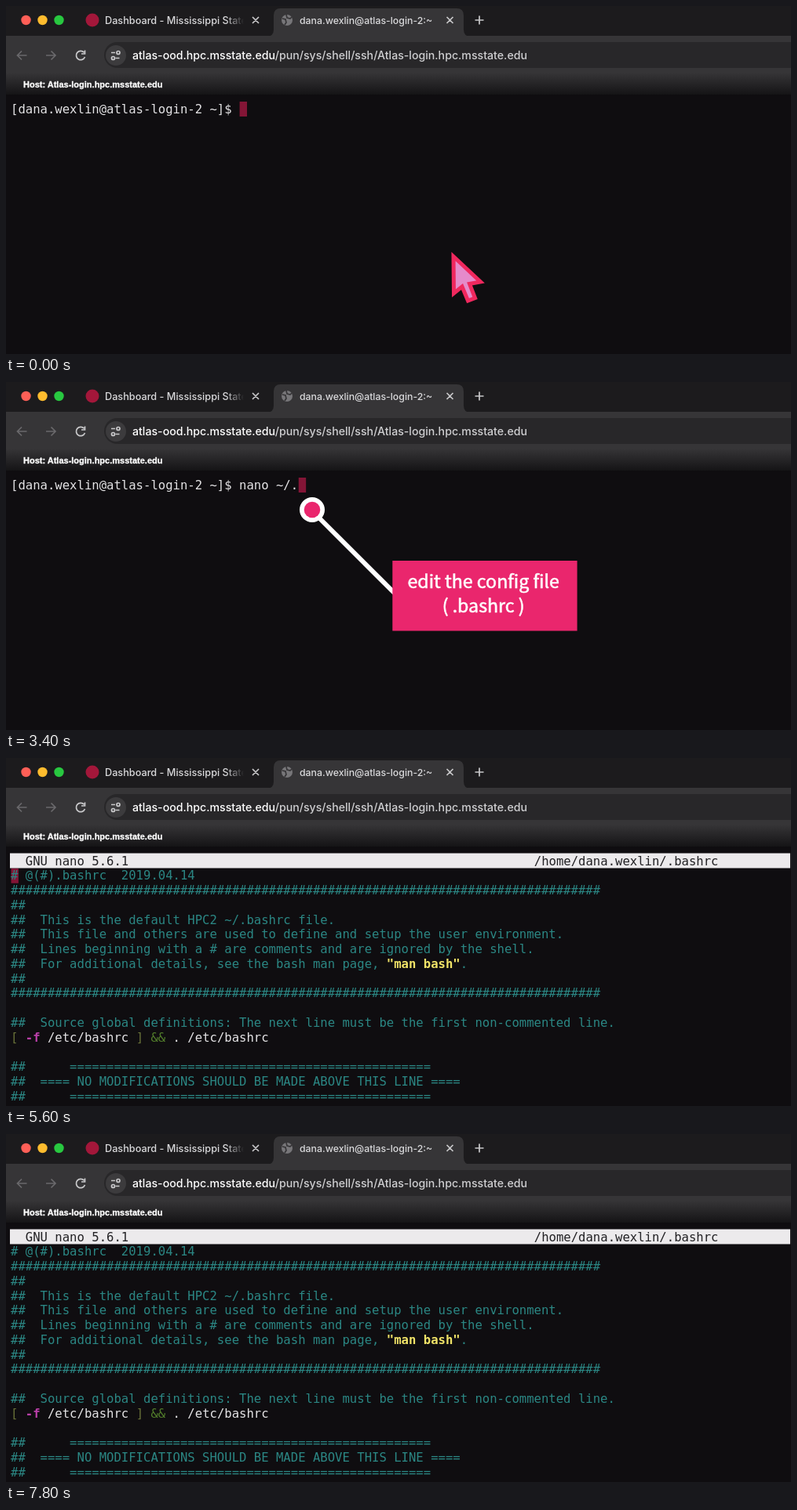
Recreate the animation shown at these times as an HTML page. Size 1000 by 444 pixels, loop 8 s.

```html
<!DOCTYPE html>
<html lang="en">
<head>
<meta charset="utf-8">
<title>Editing .bashrc on a login node</title>
<style>
  html, body { margin: 0; width: 100%; height: 100%; overflow: hidden; background: #0f0d10; }
  svg { display: block; width: 100%; height: 100%; }
  text { white-space: pre; }
  .ui { font: 500 12.7px Inter, Roboto, sans-serif; fill: #d9d9db; }
  .tab { font-size: 12.3px; }
  .url { font-size: 14.16px; fill: #d0d0d2; }
  .host { font: bold 11px "Liberation Sans", Arial, sans-serif; fill: #fff; stroke: #fff; stroke-width: .3; }
  .term { font: 15.6px "DejaVu Sans Mono", monospace; fill: #e4e3e5; }
  .note { font: 23.2px "Noto Sans CJK SC", "Noto Sans CJK JP", "Noto Sans", sans-serif;
          fill: #fff; stroke: #fff; stroke-width: .6; text-anchor: middle; }
  .icon { fill: none; stroke: #c9c9cb; stroke-width: 1.7; }
  .dim { stroke: #69686b; }
  .comment { fill: #2b8784; }
  .string { fill: #f1e468; font-weight: bold; }
  .flag { fill: #b93fa8; font-weight: bold; }
  .bracket { fill: #697239; }
  .operator { fill: #527d2b; }
</style>
</head>
<body>
<svg viewBox="0 0 1000 444">
  <defs>
    <linearGradient id="bar" x2="0" y2="1">
      <stop stop-color="#363537"/><stop offset="1" stop-color="#151416"/>
    </linearGradient>
    <linearGradient id="titleFade" gradientUnits="userSpaceOnUse" x1="280" x2="303">
      <stop stop-color="#d9d9db"/><stop offset="1" stop-color="#d9d9db" stop-opacity="0"/>
    </linearGradient>
  </defs>

  <rect width="1000" height="444" fill="#0f0d10"/>
  <rect width="1000" height="39" fill="#1c1b1d"/>
  <path d="M332 39q9 0 9-9V12q0-9 9-9h224q9 0 9 9v18q0 9 9 9z" fill="#363537"/>
  <rect y="38" width="1000" height="47" fill="#363537"/>
  <rect x="125" y="46" width="900" height="33" rx="16.5" fill="#282729"/>
  <rect y="85" width="1000" height="28" fill="url(#bar)"/>

  <circle cx="25.500" cy="18" r="6.200" fill="#ff5f57"/>
  <circle cx="46.500" cy="18" r="6.200" fill="#febc2e"/>
  <circle cx="67.500" cy="18" r="6.200" fill="#28c840"/>
  <circle cx="110" cy="18" r="8.500" fill="#a3173a"/>
  <circle cx="358" cy="18" r="7" fill="#777679"/>
  <path d="M352 16l4 1 1 4-2 3M357 11l1 4 4 1 2-2" class="icon" style="stroke:#363537"/>

  <g class="icon">
    <path d="M314 14l8 8m0-8l-8 8M561.500 14l8 8m0-8l-8 8M597.500 18h11m-5.500-5.500v11"/>
    <path class="dim" d="M26.500 63h-12m5.500-5.500l-5.500 5.500 5.500 5.500M51 63h12m-5.500-5.500l5.500 5.500-5.500 5.500"/>
    <path d="M99.500 59.300a5.700 5.700 0 1 0 1 5.700M100.500 56.500v4.500h-4.500"/>
    <circle cx="140" cy="63" r="13" fill="#3c3b3d" stroke="none"/>
    <path d="M134 59.500h5m5.500 7h-5"/>
    <circle cx="143" cy="59.500" r="2"/><circle cx="136.500" cy="66.500" r="2"/>
  </g>

  <text class="ui" x="126" y="22.500" style="fill:url(#titleFade)">Dashboard - Mississippi State</text>
  <text class="ui tab" x="374" y="22.500">dana.wexlin@atlas-login-2:~</text>
  <text class="ui url" x="161" y="68"><tspan fill="#fff">atlas-ood.hpc.msstate.edu</tspan>/pun/sys/shell/ssh/Atlas-login.hpc.msstate.edu</text>
  <text class="host" x="22" y="104">Host: Atlas-login.hpc.msstate.edu</text>

  <rect id="caret" width="9.400" height="19" fill="#831536"/>
  <text id="prompt" class="term" x="6" y="136.500"></text>
  <g id="editor" class="term">
    <rect x="5" y="121.500" width="994" height="19" fill="#eceaec"/>
  </g>
  <g id="notes"></g>
  <path id="pointer" d="M570 319.500L570.500 366.500 581 358 588.500 376 597.500 372.500 590.500 354.500 604.500 352z"
        fill="#e58aca" stroke="#f0285e" stroke-width="5"/>
</svg>
<script>
const LOOP = 8000, STEP = 200, FADE = 500;
const LEFT = 6, CELL = 9.391, ROW = 18.75, BASELINE = 136.5;
const $ = id => document.getElementById(id);
const clamp = (v, lo = 0, hi = 1) => Math.min(hi, Math.max(lo, v));
const col = n => LEFT + n * CELL;
const span = (cls, text) => `<tspan class="${cls}">${text}</tspan>`;

const PROMPT = '[dana.wexlin@atlas-login-2 ~]$ ';
const COMMAND = 'nano ~/.bashrc';
const KEY_TIMES = [400, 600, 800, 1000, 2200, 3000, 3200, 3400, 3800, 4000, 4200, 4400, 4600, 4800];
const EDITOR_OPENS = 5400;

// Editor screen
const hashes = '#'.repeat(80), rule = '##      ' + '='.repeat(49);
const fileLines = [
  '# @(#).bashrc  2019.04.14',
  hashes,
  '##',
  '##  This is the default HPC2 ~/.bashrc file.',
  '##  This file and others are used to define and setup the user environment.',
  '##  Lines beginning with a # are comments and are ignored by the shell.',
  '##  For additional details, see the bash man page, ' + span('string', '"man bash"') + '.',
  '##',
  hashes,
  '',
  '##  Source global definitions: The next line must be the first non-commented line.',
  span('bracket', '[') + span('flag', ' -f') + ' /etc/bashrc ' + span('bracket', ']') +
    span('operator', ' &amp;&amp;') + ' . /etc/bashrc',
  '',
  rule,
  '##  ==== NO MODIFICATIONS SHOULD BE MADE ABOVE THIS LINE ====',
  rule
];
const editorText = (x, row, html, attrs = '') =>
  `<text x="${x}" y="${BASELINE + row * ROW}" ${attrs}>${html}</text>`;
$('editor').innerHTML +=
  editorText(col(2), 0, 'GNU nano 5.6.1', 'fill="#222124"') +
  editorText(col(71), 0, '/home/dana.wexlin/.bashrc', 'fill="#222124"') +
  fileLines.map((line, i) =>
    editorText(LEFT, i + 1, line, line[0] === '#' ? 'class="comment"' : '')).join('');

// Callouts: a pin, a 45 degree line and a label box
const BLUE = '#1254ee', PINK = '#ea266d';
const notes = [
  { pin: [41.5, 183], box: [144, 248, 279, 89.5], color: BLUE, from: 100, to: 1400,
    lines: ['current shell is hosted', 'on a LOGIN node'] },
  { pin: [390, 163], box: [492.3, 228, 235.3, 89.5], color: PINK, from: 450, to: 4800,
    lines: ['edit the config file', '( .bashrc )'] },
  { pin: [578, 311], box: [680, 375, 306, 58], color: BLUE, from: 5750, to: 7200,
    lines: ['search for PS1 definition'] }
];
$('notes').innerHTML = notes.map(({ pin: [px, py], box: [x, y, w, h], color, lines }) => `<g>
  <path d="M${px} ${py + 1.5}l105 105" stroke="#fff" stroke-width="6"/>
  <circle cx="${px}" cy="${py}" r="16" fill="#fff"/>
  <circle cx="${px}" cy="${py}" r="10.3" fill="${color}"/>
  <rect x="${x}" y="${y}" width="${w}" height="${h}" fill="${color}"/>
  ${lines.map((s, i) => `<text class="note" x="${x + w / 2 - 1.8}" y="${y + 35 + i * 30.5}">${s}</text>`).join('')}
</g>`).join('');
const noteGroups = [...$('notes').children];

function moveCaret(column, row) {
  $('caret').setAttribute('x', col(column) + .5);
  $('caret').setAttribute('y', 122 + row * ROW);
  $('caret').style.display = row > fileLines.length ? 'none' : '';
}

function draw(now) {
  const t = Math.floor(now % LOOP / STEP) * STEP;
  const editing = t >= EDITOR_OPENS;
  const typed = COMMAND.slice(0, KEY_TIMES.filter(k => k <= t).length);

  $('editor').style.display = editing ? '' : 'none';
  $('prompt').style.display = editing ? 'none' : '';
  $('prompt').textContent = PROMPT + typed;

  // The down arrow key steps through the file, then repeats faster.
  if (!editing) moveCaret(PROMPT.length + typed.length, 0);
  else if (t <= 6400) moveCaret(0, Math.max(1, 5 + (t - 6400) / STEP));
  else moveCaret(0, 5 + Math.floor((t - 6400) * 11 / 1200));

  notes.forEach(({ from, to }, i) => {
    noteGroups[i].style.opacity = Math.min(clamp((t - from) / FADE), clamp(1 - (t - to) / FADE));
  });
  $('pointer').style.opacity = clamp(1 - t / 400);
}

const start = performance.now();
function tick() {
  draw(performance.now() - start);
  requestAnimationFrame(tick);
}
tick();
</script>
</body>
</html>
```
